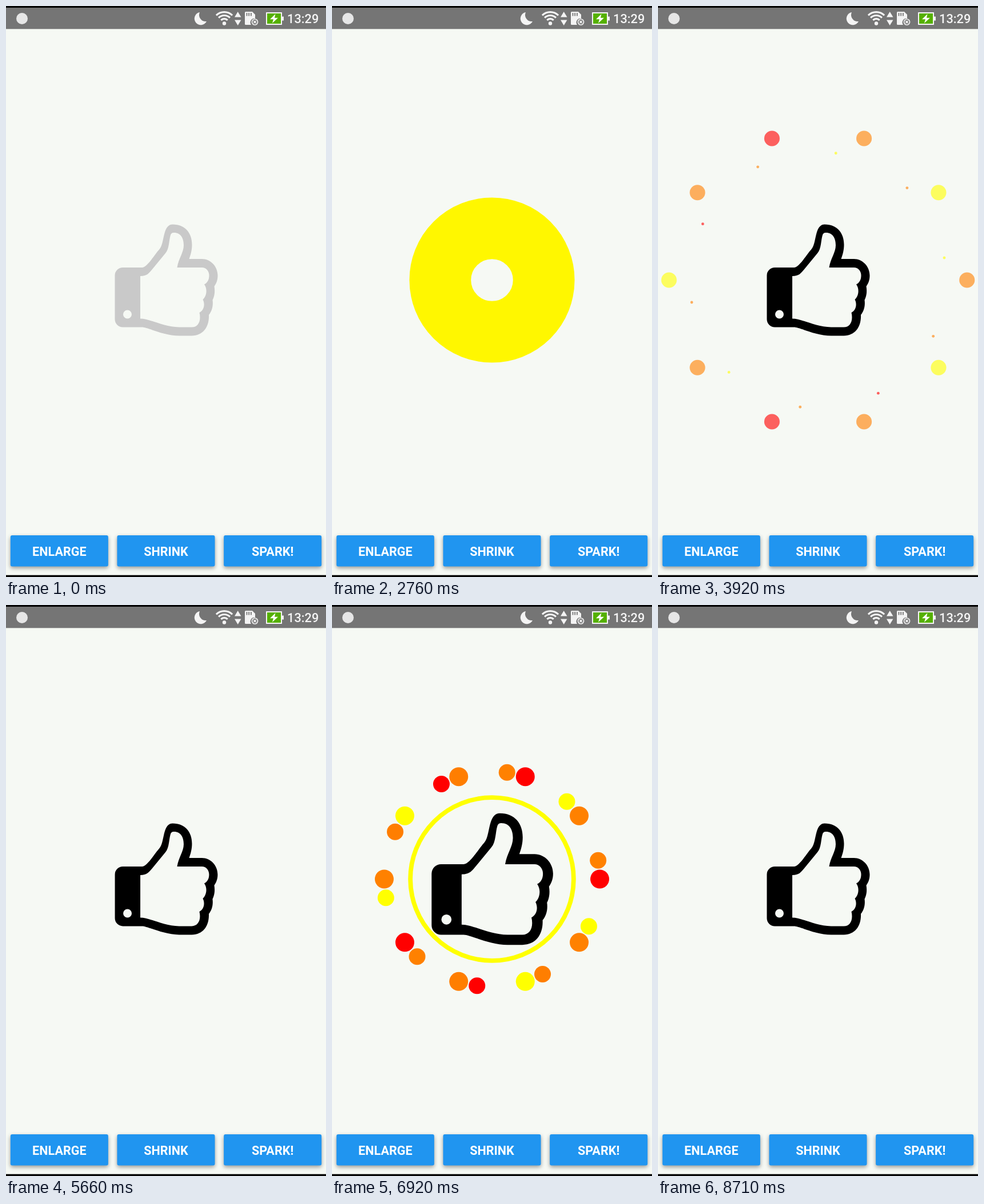
An HTML page that plays this animation: 560 by 1000 pixels, repeating every 8800 ms.

```html
<!DOCTYPE html>
<html lang="en">
<head>
<meta charset="utf-8">
<title>Spark button</title>
<style>
  html, body { margin: 0; width: 100%; height: 100%; overflow: hidden; background: #f6f9f4; }
  svg { display: block; width: 100%; height: 100%; }
  text { font-family: Roboto, "Noto Sans", sans-serif; font-weight: 500; font-size: 21.8px; }
  .label { font-weight: 700; font-size: 21.6px; fill: #fff; text-anchor: middle; }
  .key { fill: #2095f0; filter: drop-shadow(0 3px 3.5px rgba(0, 0, 0, .38)); }
  .line { fill: none; stroke: #f4f4f4; }
</style>
</head>
<body>
<svg id="stage" viewBox="0 0 560 1000" xmlns="http://www.w3.org/2000/svg">
  <rect width="560" height="1000" fill="#f6f9f4"/>

  <g id="dots"></g>
  <circle id="ring" cx="280" cy="480" fill="none"/>
  <path id="thumb" fill-rule="evenodd" d="
    M204.5 458H238C247 458 261 434 268.5 426C274 420 275 405 278 396C281 387 285 382.5 291.5 382.5
    C314 382.5 325.5 398 325.5 418C325.5 428 323 436 320.5 443H343C358 443 370.5 456 370.5 472
    C370.5 480 368 486 364.5 491C366 500 365 508 361.5 515C363 526 360 535 355 541
    C356 562 345 577.5 325 577.5H303C276 577.5 248 562.5 238 562.5H204.5
    A14 14 0 0 1 190.5 548.5V472A14 14 0 0 1 204.5 458Z
    M235 473C247 473 250 468 256 461L279 433C286 425 285 410 288 401C289.5 397.5 291 397 294 397
    C306 397 311 407 311 419C311 432 302 442 299.5 458H343C350 458 355.5 464 355.5 472
    C355.5 480 352 485 347 487.5C353 496 351 508 344.5 514C349 523 346 533 338.5 537
    C342 552 336 562.5 325 562.5H303C276 562.5 252 547.5 235 547.5Z
    M220 540A7.5 7.5 0 1 0 205 540A7.5 7.5 0 1 0 220 540Z"/>

  <g id="keys"></g>

  <!-- status bar -->
  <rect width="560" height="40.3" fill="#757575"/>
  <rect width="560" height="3"/>
  <rect y="996.7" width="560" height="3.3"/>
  <circle cx="28" cy="22" r="10" fill="#e6e6e6"/>
  <g fill="#f4f4f4">
    <path d="M339 11A11.2 11.2 0 1 0 351 27A11.5 11.5 0 0 1 339 11Z"/>
    <circle cx="382" cy="30.5" r="3.2"/>
    <path d="M400 19.5L405.7 10L411.5 19.5ZM400 24.5L405.7 34L411.5 24.5Z"/>
    <path d="M418 11.5Q418 10 419.5 10H431L436 15V22A7 7 0 0 0 429 33H419.5Q418 33 418 31.5Z"/>
    <rect x="455" y="11" width="28" height="22"/>
    <rect x="483" y="18.5" width="3" height="7"/>
    <text x="492" y="30">13:29</text>
  </g>
  <g class="line" stroke-width="3.2">
    <path d="M376.3 24.8A8 8 0 0 1 387.7 24.8M372.1 20.6A14 14 0 0 1 391.9 20.6M367.9 16.4A20 20 0 0 1 396.1 16.4"/>
  </g>
  <path d="M421.5 12V17.5M425.2 12V17.5M428.9 12V17.5" stroke="#757575" stroke-width="1.8"/>
  <g class="line" stroke-width="1.7">
    <circle cx="435.5" cy="28" r="5"/>
    <path d="M433.4 25.9L437.6 30.1M437.6 25.9L433.4 30.1"/>
  </g>
  <rect x="457" y="13" width="24" height="18" fill="#55b000"/>
  <path d="M471.5 14L462 23.2H468L466 30L476 20.8H470Z" fill="#fff"/>
</svg>
<script>
const LOOP = 8800, SLOW = 8 / 3, COUNT = 10;
const CX = 280, CY = 480;
const FAR = 280.5, NEAR = FAR * 0.8, DOT = 16.5, RING = 146.8;
const GREY = '#c9c9c9';

// press, release and burst times of the two taps
const TAPS = [
  { down: 1010, up: 2050, burst: 2181 },
  { down: 5660, up: 5850, burst: 5984 }
];

const $ = id => document.getElementById(id);
const thumb = $('thumb'), ring = $('ring');

function add(parent, tag, attrs) {
  const el = document.createElementNS('http://www.w3.org/2000/svg', tag);
  set(el, attrs);
  return parent.appendChild(el);
}

function set(el, attrs) {
  for (const k in attrs) el.setAttribute(k, attrs[k]);
}

['ENLARGE', 'SHRINK', 'SPARK!'].forEach((word, i) => {
  const cell = 560 / 3, gap = 7.8, x = i * cell;
  add($('keys'), 'rect', { class: 'key', x: x + gap, y: 927, width: cell - 2 * gap, height: 54.4, rx: 3 });
  add($('keys'), 'text', { class: 'label', x: x + cell / 2, y: 963 }).textContent = word;
});

const makeDots = () => Array.from({ length: COUNT }, () => add($('dots'), 'circle', {}));
const outer = makeDots(), inner = makeDots();

const clamp = x => Math.max(0, Math.min(1, x));
const mix = (a, b, x) => a + (b - a) * x;
const map = (x, a, b, from, to) => mix(from, to, (x - a) / (b - a));
const slowDown = x => 1 - (1 - x) ** 2;
const sway = x => (1 - Math.cos(Math.PI * x)) / 2;
const overshoot = x => (x - 1) ** 2 * (5 * (x - 1) + 4) + 1;

// red at 0, yellow at 1
const tint = x => `rgb(255,${Math.round(255 * x)},0)`;

function palette(p) {
  const x = p < 0.5 ? p * 2 : p * 2 - 1;
  const shades = p < 0.5 ? [0, x, 1, 1 - x] : [x, 1, 1 - x, 0];
  return shades.map(tint);
}

function place(dots, dist, size, turn, shift, p) {
  const colors = palette(p);
  const opacity = 1 - clamp((p - 0.6) / 0.4);
  dots.forEach((dot, i) => {
    const a = (i * 360 / COUNT + turn) * Math.PI / 180;
    set(dot, {
      cx: CX + dist * Math.cos(a),
      cy: CY + dist * Math.sin(a),
      r: Math.max(0, size),
      fill: colors[(i + shift) % 4],
      opacity
    });
  });
}

function drawDots(ms) {
  const p = sway(clamp((ms - 50) / 900));
  const on = p > 0 && p < 1;
  const far = p < 0.3 ? map(p, 0, 0.3, 0, NEAR) : map(p, 0.3, 1, NEAR, FAR);
  const near = Math.min(NEAR, map(p, 0, 0.3, 0, NEAR));
  const big = p < 0.7 ? DOT : map(p, 0.7, 1, DOT, 0);
  const small = p < 0.2 ? DOT
    : p < 0.5 ? map(p, 0.2, 0.5, DOT, DOT * 0.3)
    : map(p, 0.5, 1, DOT * 0.3, 0);
  place(outer, far, on ? big : 0, 0, 0, p);
  place(inner, near, on ? small : 0, -10, 1, p);
}

function drawRing(ms) {
  const grow = mix(0.1, 1, slowDown(clamp(ms / 250)));
  const open = ms < 200 ? 0 : mix(0.1, 1, slowDown(clamp((ms - 200) / 200)));
  const edge = RING * grow, hole = RING * open;
  const on = ms >= 0 && hole < edge;
  set(ring, {
    r: on ? (edge + hole) / 2 : 0,
    'stroke-width': on ? edge - hole : 0,
    stroke: tint(clamp(grow * 2 - 1))
  });
}

function thumbScale(t, tap, ms) {
  if (ms >= 250) return mix(0.2, 1, overshoot(clamp((ms - 250) / 350)));
  if (ms >= 0) return 0;
  const ease = span => slowDown(clamp(span / (150 * SLOW)));
  const pressed = mix(1, 0.8, ease(Math.min(t, tap.up) - tap.down));
  return mix(pressed, 1, ease(t - tap.up));
}

function draw(t) {
  const tap = t < TAPS[1].down ? TAPS[0] : TAPS[1];
  const ms = (t - tap.burst) / SLOW;
  const s = thumbScale(t, tap, ms);
  set(thumb, {
    transform: `translate(${CX} ${CY}) scale(${s}) translate(${-CX} ${-CY})`,
    fill: t < TAPS[0].burst ? GREY : '#000'
  });
  drawDots(ms);
  drawRing(ms);
}

const start = performance.now();
function tick() {
  draw((performance.now() - start) % LOOP);
  requestAnimationFrame(tick);
}
tick();
</script>
</body>
</html>
```
